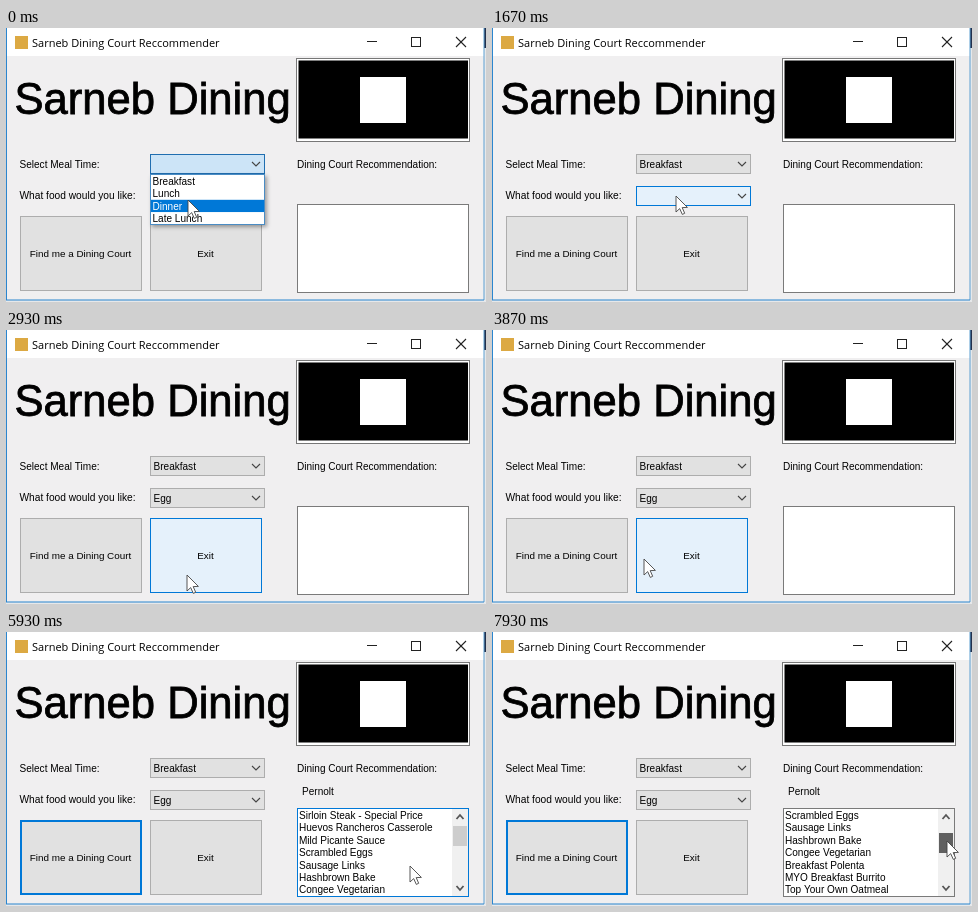
These frames come from a looping animation (480x274 px, 8000 ms). An HTML page with a canvas:

```html
<!DOCTYPE html>
<html lang="en">
<head>
<meta charset="utf-8">
<title>Dining Court Reccommender</title>
<style>
html, body { margin: 0; width: 480px; height: 274px; overflow: hidden; background: #f0f0f0; }
canvas { display: block; }
</style>
</head>
<body>
<canvas id="stage" width="480" height="274"></canvas>
<script>
const ctx = document.getElementById('stage').getContext('2d');
const LOOP = 8000;
const SANS = '"Liberation Sans", Arial, sans-serif';
const UI = `10.05px ${SANS}`;
const ROW = 12.25;

const MEALS = ['Breakfast', 'Lunch', 'Dinner', 'Late Lunch'];
const FOODS = ['Chicken', 'Beef', 'Pork', 'Potatoes', 'Fish', 'Egg', 'Cheese', 'Pizza'];
const MENU = [
  'Sirloin Steak - Special Price', 'Huevos Rancheros Casserole', 'Mild Picante Sauce',
  'Scrambled Eggs', 'Sausage Links', 'Hashbrown Bake', 'Congee Vegetarian',
  'Breakfast Polenta', 'MYO Breakfast Burrito', 'Top Your Own Oatmeal'
];

// Control looks: fill and border as RGB
const NORMAL = { fill: [225, 225, 225], line: [173, 173, 173] };
const HOVER = { fill: [229, 241, 251], line: [0, 120, 215] };
const PRESSED = { fill: [204, 228, 247], line: [32, 110, 176] };

// Pointer path: time, x, y
const PATH = [
  [70, 182, 172], [730, 182, 155], [1470, 182, 155], [1670, 184, 168],
  [2070, 184, 168], [2270, 182, 199], [2600, 181, 245], [3400, 181, 245],
  [3730, 154, 230], [3800, 154, 230], [3870, 152, 229], [4070, 118, 222],
  [4400, 118, 222], [4530, 111, 219], [5470, 111, 219], [5930, 404, 234],
  [6270, 446, 222], [6670, 455, 202], [7670, 455, 202], [7930, 455, 209]
];

const clamp = v => Math.max(0, Math.min(1, v));
const ramp = (t, a, b) => clamp((t - a) / (b - a));
const lerp = (a, b, p) => a + (b - a) * p;
const rgb = c => `rgb(${c.map(Math.round).join(',')})`;

function blend(a, b, p) {
  const mix = k => a[k].map((v, i) => lerp(v, b[k][i], p));
  return { fill: mix('fill'), line: mix('line') };
}

// Fades through a series of looks: [start, end, look]
function fade(t, steps) {
  return steps.reduce((look, [a, b, next]) => t < a ? look : blend(look, next, ramp(t, a, b)), NORMAL);
}

function pointerAt(t) {
  const i = PATH.findIndex(k => k[0] > t);
  if (i === 0) return { x: PATH[0][1], y: PATH[0][2] };
  if (i < 0) { const k = PATH[PATH.length - 1]; return { x: k[1], y: k[2] }; }
  const a = PATH[i - 1], b = PATH[i];
  const p = ramp(t, a[0], b[0]), e = p * p * (3 - 2 * p);
  return { x: lerp(a[1], b[1], e), y: lerp(a[2], b[2], e) };
}

function rect(x, y, w, h, color) {
  ctx.fillStyle = color;
  ctx.fillRect(x, y, w, h);
}

function frame(x, y, w, h, color, thick = 1) {
  ctx.strokeStyle = color;
  ctx.lineWidth = thick;
  ctx.strokeRect(x + thick / 2, y + thick / 2, w - thick, h - thick);
}

function text(s, x, y, { font = UI, color = '#000', align = 'left', weight = 0 } = {}) {
  ctx.font = font;
  ctx.fillStyle = ctx.strokeStyle = color;
  ctx.textAlign = align;
  ctx.fillText(s, x, y);
  if (weight) {
    ctx.lineWidth = weight;
    ctx.strokeText(s, x, y);
  }
}

function lines(points, color, width) {
  ctx.beginPath();
  points.forEach(([x, y], i) => i ? ctx.lineTo(x, y) : ctx.moveTo(x, y));
  ctx.strokeStyle = color;
  ctx.lineWidth = width;
  ctx.stroke();
}

function chevron(x, y, w, h, color, width = 1.1) {
  lines([[x - w, y - h], [x, y + h], [x + w, y - h]], color, width);
}

function drawWindow() {
  rect(0, 0, 480, 274, '#e6e8ea');
  rect(478, 0, 2, 20, '#22304c');
  rect(0, 0, 478, 272, '#f0eff0');
  rect(0, 0, 478, 28, '#fff');
  rect(0, 0, 1, 272, '#2b86cf');
  rect(477.5, 0, 1, 272, '#5c9fd2');
  rect(0, 271.5, 478, 1, '#2b86cf');
  rect(9, 8, 13, 13, '#dca943');
  text('Sarneb Dining Court Reccommender', 26, 18.5, { font: '11px "Open Sans", "Noto Sans", sans-serif' });
  rect(361, 13, 10, 1, '#222');
  frame(405, 9, 10, 10, '#222');
  lines([[450, 9], [460, 19]], '#222', 1.1);
  lines([[460, 9], [450, 19]], '#222', 1.1);
}

function drawStatic() {
  text('Sarneb Dining', 8.5, 86, { font: `43.6px ${SANS}`, weight: 0.8 });
  text('Select Meal Time:', 13.5, 139.5);
  text('What food would you like:', 13.5, 171.2, { font: `10.2px ${SANS}` });
  text('Dining Court Recommendation:', 291, 139.5);
  rect(290, 30, 174, 84, '#fff');
  frame(290, 30, 174, 84, '#777');
  rect(292.5, 32.5, 169.5, 78, '#000');
  rect(354, 49, 46, 46, '#fff');
}

function drawCombo(y, look, value) {
  rect(144, y, 115, 20, rgb(look.fill));
  frame(144, y, 115, 20, rgb(look.line));
  chevron(250, y + 10, 4, 2, '#444');
  text(value, 147.5, y + 13.5);
}

function drawButton(x, w, look, label, focused) {
  rect(x, 188, w, 75, rgb(look.fill));
  frame(x, 188, w, 75, focused ? '#0078d7' : rgb(look.line), focused ? 2 : 1);
  text(label, x + w / 2 - 0.5, 229, { font: `9.9px ${SANS}`, align: 'center' });
}

function drawPopup(y, items, height, pointerY) {
  const top = y + 1.3;
  const active = Math.floor((pointerY - top) / ROW);
  ctx.save();
  ctx.shadowColor = 'rgba(0,0,0,.35)';
  ctx.shadowBlur = 4;
  ctx.shadowOffsetX = ctx.shadowOffsetY = 2;
  rect(144, y, 115, height, '#fff');
  ctx.restore();
  ctx.save();
  ctx.beginPath();
  ctx.rect(144, y, 115, height);
  ctx.clip();
  items.forEach((item, i) => {
    const rowY = top + i * ROW;
    if (i === active) rect(145, rowY, 113, ROW, '#0078d7');
    text(item, 146.5, rowY + 9.7, { color: i === active ? '#fff' : '#000' });
  });
  ctx.restore();
  frame(144, y, 115, height, '#4a8cc4');
}

function drawList(t, p) {
  const filled = t >= 5470;
  const over = filled && p.x > 291 && p.x < 446 && p.y > 177;
  rect(291, 176, 172, 89, '#fff');
  if (filled) {
    const first = Math.round(3 * ramp(t, 7670, 7930));
    text('Pernolt', 296, 162.5);
    MENU.slice(first, first + 7).forEach((s, i) => text(s, 293, 187 + i * 12.4));
    rect(446, 177, 16, 87, '#f0f0f0');
    chevron(454, 185, 3.5, -2, '#555', 1.8);
    chevron(454, 256, 3.5, 2, '#555', 1.8);
    const thumb = t >= 7670 ? '#606060' : p.x > 446 ? '#a6a6a6' : '#cdcdcd';
    rect(447, 194 + Math.round(7 * ramp(t, 7670, 7930)), 14, 20, thumb);
  }
  frame(291, 176, 172, 89, over ? '#0078d7' : '#7a7a7a');
}

function drawPointer({ x, y }) {
  const shape = [[0, 0], [0, 16], [3.7, 12.6], [6.3, 18.4], [8.7, 17.3], [6.2, 11.6], [11.4, 11.4]];
  ctx.beginPath();
  shape.forEach(([dx, dy]) => ctx.lineTo(x + dx, y + dy));
  ctx.closePath();
  ctx.fillStyle = '#fff';
  ctx.fill();
  ctx.strokeStyle = '#444';
  ctx.lineWidth = 0.9;
  ctx.stroke();
}

function draw(t) {
  const p = pointerAt(t);
  const meal = fade(t, [[-1, 0, PRESSED], [930, 1170, NORMAL]]);
  const food = fade(t, [[1530, 1670, HOVER], [1730, 1800, PRESSED], [2670, 2870, NORMAL]]);
  const exit = fade(t, [[2670, 2930, HOVER], [3930, 4070, NORMAL]]);
  const find = fade(t, [[3930, 4070, HOVER], [4800, 4870, PRESSED], [4930, 5070, HOVER], [5530, 5730, NORMAL]]);

  drawWindow();
  drawStatic();
  drawCombo(126, meal, t < 930 ? '' : 'Breakfast');
  drawCombo(158, food, t < 2670 ? '' : 'Egg');
  drawButton(14, 122, find, 'Find me a Dining Court', t >= 5070);
  drawButton(144, 112, exit, 'Exit', false);
  drawList(t, p);
  if (t < 930) drawPopup(146, MEALS, 51, p.y);
  if (t >= 1730 && t < 2670) drawPopup(178, FOODS, lerp(25, 110, ramp(t, 1730, 1930)), p.y);
  drawPointer(p);
}

function tick() {
  const step = Math.min(119, Math.floor((performance.now() % LOOP + 4) * 15 / 1000));
  draw(Math.round(step * 20 / 3) * 10);
  requestAnimationFrame(tick);
}
tick();
</script>
</body>
</html>
```
